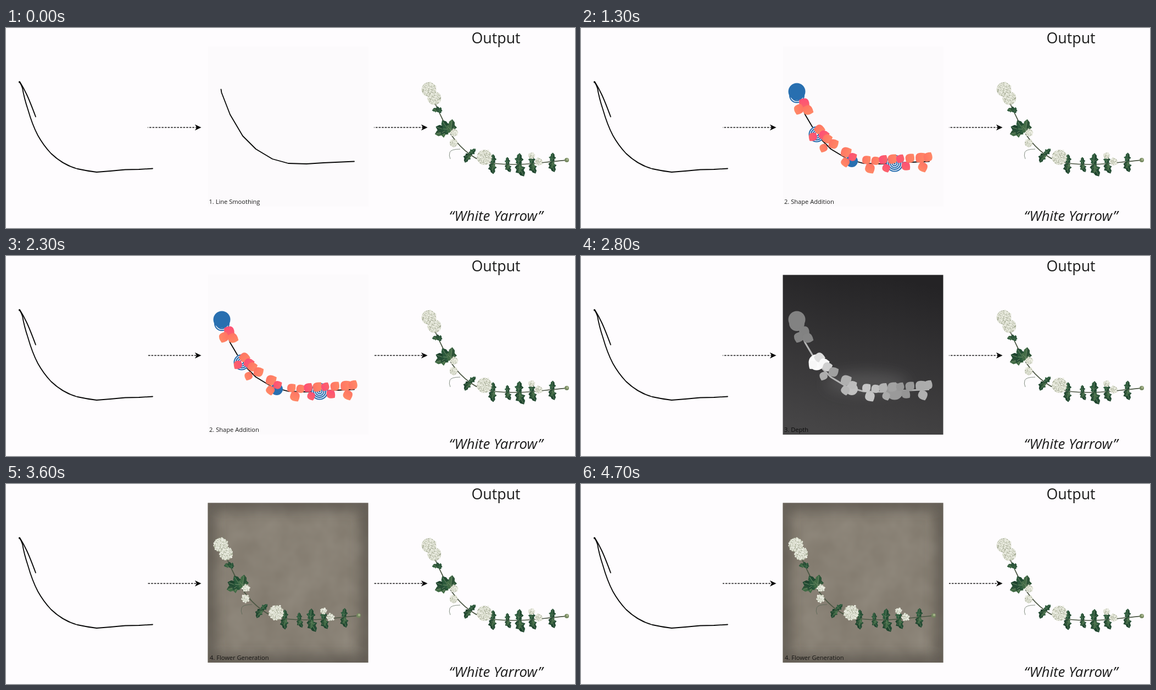
Recreate the animation shown at these times as an HTML page. Size 1036 by 365 pixels, loop 4800 ms.

```html
<!DOCTYPE html>
<html lang="en">
<head>
<meta charset="utf-8">
<title>Sketch to flower</title>
<style>
  html, body { margin: 0; width: 100%; height: 100%; overflow: hidden; background: #fefcfe; }
  svg { display: block; width: 1036px; height: 365px; }
  text { font-family: "Open Sans", "Noto Sans", sans-serif; fill: #1c1c1c; }
  .caption { font-size: 11.1px; }
  .ink { fill: none; stroke: #080808; stroke-width: 1.8; stroke-linecap: round; stroke-linejoin: round; }
</style>
</head>
<body>
<svg id="stage" viewBox="0 0 1036 365" xmlns="http://www.w3.org/2000/svg"></svg>
<script>
const LOOP = 4800, SCENE = 1200;
const DASH = 3.5, PERIOD = 5.6, MARCH = 1400;
const GOLDEN = 2.39996;
const LINE = "M391.5 112L392.5 118 408 158 431 197 455 221 485 239 514 247 547 248 578 246 634 243.5";
const STEM = "M402 136Q409 152 416 166T433 196Q447 216 466 230T508 246Q545 250 585 246T643 240";

// Clusters sit at distances along their curve.
const petalStops = [28, 88, 114, 157, 200, 232, 264, 298];
const leafStops = [[16, 11], [58, 26], [114, 18], [160, 20], [187, 16], [207, 25], [231, 20], [268, 20]];
const discs = [[393, 123, 14], [393, 116, 15.5, true], [429, 194, 14.5], [493, 243, 11, true], [571, 247, 15.5]];
const blooms = [[391, 111, 13], [401, 127, 12], [437, 190, 6.5], [436, 209, 7], [492, 235, 13.5], [578, 232, 5.5], [591, 243, 6.5]];

let seed = 7;
const rnd = () => (seed = (seed * 16807) % 2147483647) / 2147483647;
const vary = (mid, spread) => mid + (rnd() * 2 - 1) * spread;
const bell = (x, mid, width) => Math.exp(-(((x - mid) / width) ** 2));

// Returns a function giving the point and heading (degrees) at a distance along the path.
function tracer(d) {
  const path = document.createElementNS("http://www.w3.org/2000/svg", "path");
  path.setAttribute("d", d);
  return s => {
    const a = path.getPointAtLength(s - 4), b = path.getPointAtLength(s + 4), { x, y } = path.getPointAtLength(s);
    return { x, y, heading: Math.atan2(b.y - a.y, b.x - a.x) * 180 / Math.PI };
  };
}
const onLine = tracer(LINE), onStem = tracer(STEM);

const petals = petalStops.flatMap(stop => [0, 1, 2].map(j => {
  const { x, y, heading } = onLine(stop + (j - 1) * 8);
  return { x, y, angle: heading + (j % 2 ? 1 : -1) * vary(55, 22), len: vary(20, 3), pink: rnd() < .45 };
}));

// Leaves fan to the outer side on the steep part and alternate sides further on.
const leaves = leafStops.flatMap(([stop, size]) => {
  const steep = stop < 100;
  return Array.from({ length: steep ? 4 : 3 }, (_, j) => {
    const { x, y, heading } = onStem(stop + (j - 1) * 2);
    const turn = steep ? 104 + j * 39 : (j % 2 ? -1 : 1) * (68 + j * 18);
    return { x, y, angle: heading + vary(turn, 10), len: size * (steep ? 1 : 1 - j * .17) };
  });
});

const depthAt = x => Math.round(128 + 112 * bell(x, 430, 12) + 70 * bell(x, 510, 60) + 45 * bell(x, 620, 25));
const grey = x => `rgb(${depthAt(x)},${depthAt(x)},${depthAt(x)})`;
const circle = (x, y, r, attrs) => `<circle cx="${x}" cy="${y}" r="${r}" ${attrs}/>`;
const place = p => `translate(${p.x.toFixed(1)} ${p.y.toFixed(1)}) rotate(${p.angle.toFixed(1)}) scale(${p.len.toFixed(1)})`;
const petal = (p, fill) => `<path transform="${place(p)}" fill="${fill}" d="M0 0Q.45-.85 1 0 .45.85 0 0Z"/>`;

function disc([x, y, r, solid]) {
  if (solid) return circle(x, y, r, 'fill="#286fb0"');
  let out = circle(x, y, r, 'fill="#fcfafc"');
  for (let q = r - 1; q > 0; q -= 3.4) out += circle(x, y, q, 'fill="none" stroke="#286fb0" stroke-width="2.1"');
  return out;
}

function leaf(p, i) {
  const tone = ["#2c5a3c", "#426b46", "#244c34"][i % 3];
  return `<g transform="${place(p)}">
    <path fill="${tone}" d="M0 0L.1-.26 .28-.22 .46-.4 .58-.2 .8-.2 1 0 .8.2 .6.22 .46.4 .3.23 .1.27Z"/>
    <path fill="#173b28" opacity=".5" d="M0 0L1 0 .8.2 .6.22 .46.4 .3.23 .1.27Z"/>
    <path fill="none" stroke="#7d9773" stroke-width=".03" d="M0 0H.9M.25 0L.45-.25M.25 0L.45.25"/></g>`;
}

function bloom([x, y, r]) {
  let out = circle(x, y, r, 'fill="#a5aa94"');
  const n = Math.round(r * r * .34) + 4;
  for (let i = 0; i < n; i++) {
    const k = r * Math.sqrt((i + .5) / n);
    const px = vary(x + k * Math.cos(i * GOLDEN), .6).toFixed(1), py = vary(y + k * Math.sin(i * GOLDEN), .6).toFixed(1);
    out += circle(px, py, vary(1.55, .3).toFixed(2), `fill="${i % 3 ? "#eeefe5" : "#dfe2d3"}"`);
    if (i % 3 === 1) out += circle(px, py, .45, 'fill="#a3a883"');
  }
  return out;
}

const caption = (x, s, fill = "#1c1c1c") => `<text class="caption" x="${x}" y="321" style="fill:${fill}">${s}</text>`;
const panel = fill => `<rect x="367.5" y="34.500" width="292" height="291.500" fill="${fill}"/>`;
const line = `<path class="ink" d="${LINE}"/>`;
const arrow = dx => `<g transform="translate(${dx} 0)">
  <path class="dash" d="M258 181.5H347" fill="none" stroke="#111" stroke-width="1.4" stroke-dasharray="${DASH} ${PERIOD - DASH}"/>
  <path d="M355.5 181.5L344 176 347 181.5 344 187Z" fill="#080808"/></g>`;

const sprig = `<g id="sprig">
  <path d="${STEM}" fill="none" stroke="#4b5643" stroke-width="1.7"/>
  <path d="M448 220Q431 220 429 226T430 238" fill="none" stroke="#526150" opacity=".7"/>
  ${leaves.map(leaf).join("")}${blooms.map(bloom).join("")}
  ${circle(642, 240, 4, 'fill="#74885f"')}${circle(643, 239, 2.2, 'fill="#a3b088"')}</g>`;

const scenes = [
  panel("#fcfafc") + line + caption(369.5, "1. Line Smoothing"),

  panel("#fcfafc") + line + discs.map(disc).join("") +
  petals.map(p => petal(p, p.pink ? "url(#pink)" : "url(#orange)")).join("") + caption(370, "2. Shape Addition"),

  panel("url(#dark)") + `<g clip-path="url(#crop)" filter="url(#soft)">
    <ellipse cx="520" cy="232" rx="75" ry="20" fill="#777" opacity=".4"/></g>
    <path d="${LINE}" fill="none" stroke="#b4b4b4" stroke-width="3"/>
    <g filter="url(#haze)">` +
  discs.map(([x, y, r]) => circle(x, y, r, `fill="${grey(x)}"`)).join("") +
  petals.map(p => petal(p, grey(p.x))).join("") + "</g>" + caption(370, "3. Depth", "#0c0c0c"),

  panel("#7f776b") + `<g clip-path="url(#crop)">
    <rect x="367" y="34" width="293" height="293" filter="url(#mottle)"/>
    <rect x="367.5" y="34" width="292" height="292" fill="none" stroke="#45403a" stroke-width="24" opacity=".65" filter="url(#soft)"/></g>
    <use href="#sprig"/>` + caption(371, "4. Flower Generation", "#171614")
];

const gradient = (id, a, b, dirs) => `<linearGradient id="${id}" ${dirs}><stop stop-color="${a}"/><stop offset="1" stop-color="${b}"/></linearGradient>`;
const stage = document.getElementById("stage");
stage.innerHTML = `<defs>
  ${gradient("pink", "#ff4a7a", "#fa6a66", 'x2="1" y2="1"')}
  ${gradient("orange", "#ff6f62", "#ff8f68", 'x2="1" y2="1"')}
  ${gradient("dark", "#242325", "#464546", 'x1=".6" y1="0" x2=".4" y2="1"')}
  <clipPath id="crop"><rect x="367.5" y="34.500" width="292" height="291.500"/></clipPath>
  <filter id="soft" x="-50%" y="-50%" width="200%" height="200%"><feGaussianBlur stdDeviation="12"/></filter>
  <filter id="haze"><feGaussianBlur stdDeviation=".6"/></filter>
  <filter id="mottle"><feTurbulence type="fractalNoise" baseFrequency=".02" numOctaves="3" seed="4"/>
    <feColorMatrix values="0 0 0 0 .6  0 0 0 0 .57  0 0 0 0 .5  .25 0 0 0 0"/></filter>
  ${sprig}</defs>
  <rect width="1036" height="365" fill="#fefcfe"/>
  <path class="ink" d="M24 98Q27 101 30 110Q33 128 40 149Q48 177 58 196Q68 214 82 229Q104 250 130 257Q148 261 165 263Q192 261 217 258.5L242 258 267 256.5"/>
  <path class="ink" d="M24 99.500L25 98Q32 109 38 122T54 162"/>
  ${arrow(0)}${arrow(412)}
  <text x="892" y="28" font-size="26.800" text-anchor="middle">Output</text>
  <text x="892" y="352" font-size="26" font-style="italic" text-anchor="middle">“White Yarrow”</text>
  <use href="#sprig" x="379" y="1"/>
  ${scenes.map(s => `<g class="scene">${s}</g>`).join("")}`;

const layers = [...stage.querySelectorAll(".scene")];
const dashes = stage.querySelectorAll(".dash");

function update(t) {
  const active = Math.floor(t / SCENE);
  layers.forEach((g, i) => g.setAttribute("display", i === active ? "inline" : "none"));
  const offset = -3 - t / MARCH * PERIOD;
  dashes.forEach(d => d.setAttribute("stroke-dashoffset", offset.toFixed(3)));
}

const start = performance.now();
function tick() {
  update((performance.now() - start) % LOOP);
  requestAnimationFrame(tick);
}
update(0);
requestAnimationFrame(tick);
</script>
</body>
</html>
```
